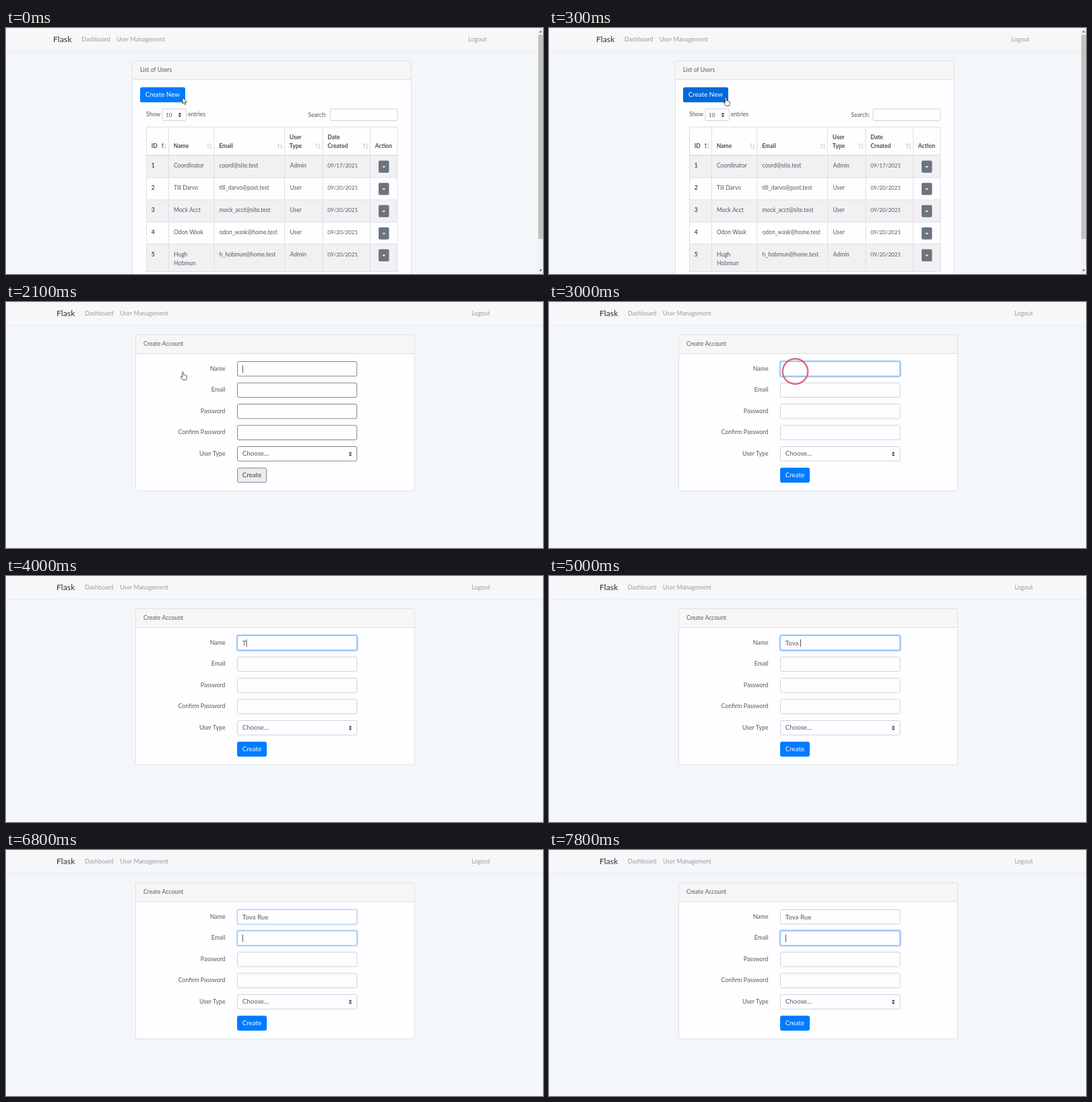
Write an HTML page with a canvas that moves like this. It is 797 px wide and 365 px high and loops after 8000 ms.

```html
<!DOCTYPE html>
<html lang="en">
<head>
<meta charset="utf-8">
<title>User management</title>
<style>
html, body { margin: 0; width: 100%; height: 100%; overflow: hidden; background: #f4f7fa; }
canvas { display: block; }
</style>
</head>
<body>
<canvas id="stage" width="797" height="365"></canvas>
<script>
const ctx = document.getElementById('stage').getContext('2d');
const LOOP = 8000;
const INK = '#555a60', DARK = '#212529', MUTED = '#9b9da0';
const LINE = '#dee0e3', PAPER = '#fefdff', BLUE = '#007bff';

const clamp = v => Math.max(0, Math.min(1, v));
const mix = (a, b, k) => `rgb(${a.map((v, i) => Math.round(v + (b[i] - v) * k))})`;

function font(size, weight = 400) {
  ctx.font = `${weight} ${size}px Lato, "Open Sans", sans-serif`;
}

function text(str, x, y, size, color = INK, weight = 400, align = 'left') {
  font(size, weight);
  ctx.textAlign = align;
  ctx.fillStyle = color;
  ctx.fillText(str, x, y);
}

function rect(x, y, w, h, color) {
  ctx.fillStyle = color;
  ctx.fillRect(x, y, w, h);
}

function box(x, y, w, h, fill, stroke, r = 2, width = 1) {
  ctx.beginPath();
  ctx.roundRect(x, y, w, h, r);
  if (fill) { ctx.fillStyle = fill; ctx.fill(); }
  if (stroke) { ctx.strokeStyle = stroke; ctx.lineWidth = width; ctx.stroke(); }
}

function poly(points, fill, stroke, width = 0.8) {
  ctx.beginPath();
  points.forEach(([x, y]) => ctx.lineTo(x, y));
  ctx.closePath();
  ctx.fillStyle = fill;
  ctx.fill();
  if (stroke) { ctx.strokeStyle = stroke; ctx.lineWidth = width; ctx.lineJoin = 'round'; ctx.stroke(); }
}

function selectArrows(x, y) {
  poly([[x - 2.4, y - 0.8], [x, y - 3.4], [x + 2.4, y - 0.8]], '#343a40');
  poly([[x - 2.4, y + 0.8], [x, y + 3.4], [x + 2.4, y + 0.8]], '#343a40');
}

function arrowCursor(x, y) {
  const shape = [[0, 0], [0, 9.3], [2.1, 7.4], [3.5, 10.6], [5, 9.9], [3.6, 6.8], [6.5, 6.8]];
  poly(shape.map(([a, b]) => [x + a, y + b]), '#fff', '#222');
}

function handCursor(x, y) {
  ctx.save();
  ctx.translate(x, y);
  ctx.beginPath();
  ctx.moveTo(-1, 8);
  ctx.lineTo(-1, 1);
  ctx.quadraticCurveTo(0, -0.8, 1, 1);
  ctx.lineTo(1, 4.8);
  ctx.quadraticCurveTo(2.2, 4, 3, 5.3);
  ctx.quadraticCurveTo(4.2, 4.6, 4.6, 5.8);
  ctx.quadraticCurveTo(6, 5.4, 6, 7);
  ctx.lineTo(5.6, 10.5);
  ctx.lineTo(4.8, 12.4);
  ctx.lineTo(0, 12.4);
  ctx.lineTo(-3.4, 8);
  ctx.quadraticCurveTo(-3.4, 6, -1, 8);
  ctx.fillStyle = '#fff';
  ctx.fill();
  ctx.strokeStyle = '#333';
  ctx.lineWidth = 0.8;
  ctx.stroke();
  ctx.restore();
}

// A ring that grows and disappears after a press
function clickRing(x, y, age) {
  if (age < 0 || age >= 200) return;
  ctx.beginPath();
  ctx.arc(x, y, 18.7 + age * 0.03, 0, Math.PI * 2);
  ctx.strokeStyle = `rgba(219, 82, 98, ${0.85 - age * 0.004})`;
  ctx.lineWidth = 2.4;
  ctx.stroke();
}

function frame(title, dx, bottom) {
  rect(0, 0, 797, 365, '#f4f7fa');
  rect(0, 0, 797, 35, '#f5f7f9');
  rect(0, 34.5, 797, 1, '#e8ebee');
  rect(0, 35.5, 797, 1, '#f0f3f6');
  text('Flask', 75 + dx, 21, 12.3, '#303336');
  text('Dashboard', 117 + dx, 20.3, 8.95, MUTED);
  text('User Management', 169 + dx, 20.3, 8.95, MUTED);
  text('Logout', 691 + dx, 20.3, 8.95, MUTED);
  const x = 192.5 + dx;
  box(x, 48.5, 414, bottom - 48.5, PAPER, LINE);
  rect(x + 0.5, 49, 413, 27, '#f6f6f7');
  rect(x, 76, 414, 1, LINE);
  text(title, 204 + dx, 65.3, 8.7);
}

const COLS = [208.5, 241.5, 309, 413.5, 470, 540.5, 581];
const ROWS = [189, 222, 255, 288, 320.5, 361.5];
const HEAD = [['ID'], ['Name'], ['Email'], ['User', 'Type'], ['Date', 'Created'], ['Action']];
const USERS = [
  [['Coordinator'], 'coord@site.test', 'Admin', '09/17/2021'],
  [['Till Darvo'], 'till_darvo@post.test', 'User', '09/20/2021'],
  [['Mock Acct'], 'mock_acct@site.test', 'User', '09/20/2021'],
  [['Odon Wask'], 'odon_wask@home.test', 'User', '09/20/2021'],
  [['Hugh', 'Hobmun'], 'h_hobmun@home.test', 'Admin', '09/20/2021']
];

function sortIcon(x, active) {
  const stem = (sx, dir, color) => {
    ctx.strokeStyle = color;
    ctx.lineWidth = 0.9;
    ctx.beginPath();
    ctx.moveTo(sx, 175 + 3.5 * dir);
    ctx.lineTo(sx, 175 - 3.5 * dir);
    ctx.moveTo(sx - 1.6, 175 - 1.7 * dir);
    ctx.lineTo(sx, 175 - 3.5 * dir);
    ctx.lineTo(sx + 1.6, 175 - 1.7 * dir);
    ctx.stroke();
  };
  stem(x - 10, 1, active ? '#55585c' : '#c8cacd');
  stem(x - 6, -1, '#c8cacd');
}

function table() {
  for (let i = 0; i < 5; i += 2) rect(208.5, ROWS[i], 372.5, ROWS[i + 1] - ROWS[i], '#f1f0f2');
  COLS.forEach(x => rect(x - 0.5, 147, 1, 215, LINE));
  ROWS.forEach((y, i) => rect(208, y - (i ? 0.5 : 1), 373, i ? 1 : 1.5, LINE));
  rect(208, 146.5, 373, 1, LINE);
  HEAD.forEach((lines, i) => {
    lines.forEach((s, k) => text(s, COLS[i] + 7.2, 178 - 13.5 * (lines.length - 1 - k), 8.6, '#4a4e53', 700));
    if (i < 5) sortIcon(COLS[i + 1] + 1, i === 0);
  });
  USERS.forEach(([name, mail, kind, date], i) => {
    const y = ROWS[i] + 18;
    text(String(i + 1), 215.7, y, 8.5, '#4a4e53', 700);
    name.forEach((s, k) => text(s, 249, y + 13.3 * k, 8.5));
    text(mail, 316.5, y, 8.5);
    text(kind, 421.5, y, 8.5);
    text(date, 477.3, y, 8.1);
    box(553, ROWS[i] + 7.8, 15.5, 18, '#6c757d', null);
    const cy = ROWS[i] + 16;
    poly([[558.4, cy], [563.2, cy], [560.8, cy + 2.5]], '#fff');
  });
}

function scrollbar() {
  rect(789, 0, 8, 365, '#f1f1f1');
  rect(790, 10, 7, 303, '#c1c1c1');
  poly([[791.3, 6.5], [793.5, 4], [795.7, 6.5]], '#505050');
  poly([[791.3, 358.5], [793.5, 361], [795.7, 358.5]], '#505050');
}

function listPage(t) {
  frame('List of Users', -5, 380);
  if (t >= 600) box(198.2, 87.2, 68.6, 24, null, 'rgba(0,123,255,.45)', 3, 2.2);
  box(199, 88, 67, 22.3, mix([0, 123, 255], [0, 105, 217], clamp(t / 150)), null, 2.5);
  text('Create New', 206.8, 102.3, 9.8, '#fff');
  text('Show', 208, 131.2, 8.7);
  box(232, 120, 35.5, 17.5, PAPER, '#ced4da');
  text('10', 237, 132, 8.4);
  selectArrows(258, 129);
  text('entries', 270, 131.2, 8.7);
  text('Search:', 476, 132, 8.7, INK, 400, 'right');
  box(481, 120, 100, 17.5, PAPER, '#ced4da');
  table();
  scrollbar();
  if (t < 100) arrowCursor(262, 103);
  else handCursor(262.5, 103.3);
  clickRing(262, 103, t - 600);
}

const FIELDS = ['Name', 'Email', 'Password', 'Confirm Password', 'User Type'];
const TYPED = 'Tova Rue';
const KEYS = [4000, 4300, 4500, 4600, 5000, 5800, 6200, 6400];
const RESETS = [2200, ...KEYS, 6800];

function caretOn(t) {
  const last = RESETS.filter(k => k <= t).pop() || t;
  return Math.floor((t - last) / 500) % 2 === 0;
}

function formPage(t) {
  const load = clamp((t - 2100) / 150);
  const tab = clamp((t - 6700) / 150);
  const typed = TYPED.slice(0, KEYS.filter(k => k <= t).length);
  const active = t >= 6700 ? 1 : 0;
  const border = mix([132, 132, 135], [206, 212, 218], load);
  frame('Create Account', 0, 280);
  FIELDS.forEach((label, i) => {
    const y = 88.5 + 31.5 * i;
    const glow = i === 0 ? load * (1 - tab) : i === 1 ? tab : 0;
    text(label, 325.5, y + 13.3, 8.75, INK, 400, 'right');
    if (glow) box(342.6, y - 0.9, 179.2, 23.3, null, `rgba(0,123,255,${0.3 * glow})`, 3, 2.2);
    box(343.5, y, 177.3, 21.5, PAPER, border);
    if (glow) box(343.5, y, 177.3, 21.5, null, `rgba(128,189,255,${glow})`);
  });
  text('Choose...', 350.8, 228.3, 9.7);
  selectArrows(511, 225.5);
  text(typed, 350.8, 102.8, 9.7);
  if (caretOn(t)) {
    font(9.7);
    const x = 350.8 + (active ? 0 : ctx.measureText(typed).width);
    rect(x, 94 + 31.5 * active, 0.9, 11, '#33373b');
  }
  box(343.5, 246.3, 43, 21.3, mix([236, 236, 238], [0, 123, 255], load),
    mix([132, 132, 135], [0, 123, 255], load), 2.2);
  text('Create', 350.8, 260.2, 9.7, mix([60, 63, 67], [255, 255, 255], load));

  const k = clamp((t - 2100) / 600);
  const x = 262.5 + 102.5 * k * k * (3 - 2 * k);
  if (t < 2200) handCursor(x, 103.3);
  else if (x < 343) arrowCursor(x, 103);
  clickRing(365.5, 103, t - 3000);
}

const start = performance.now();
function draw() {
  const t = Math.floor(((performance.now() - start) % LOOP) / 100) * 100;
  if (t < 2100) listPage(t);
  else formPage(t);
  requestAnimationFrame(draw);
}
draw();
</script>
</body>
</html>
```
